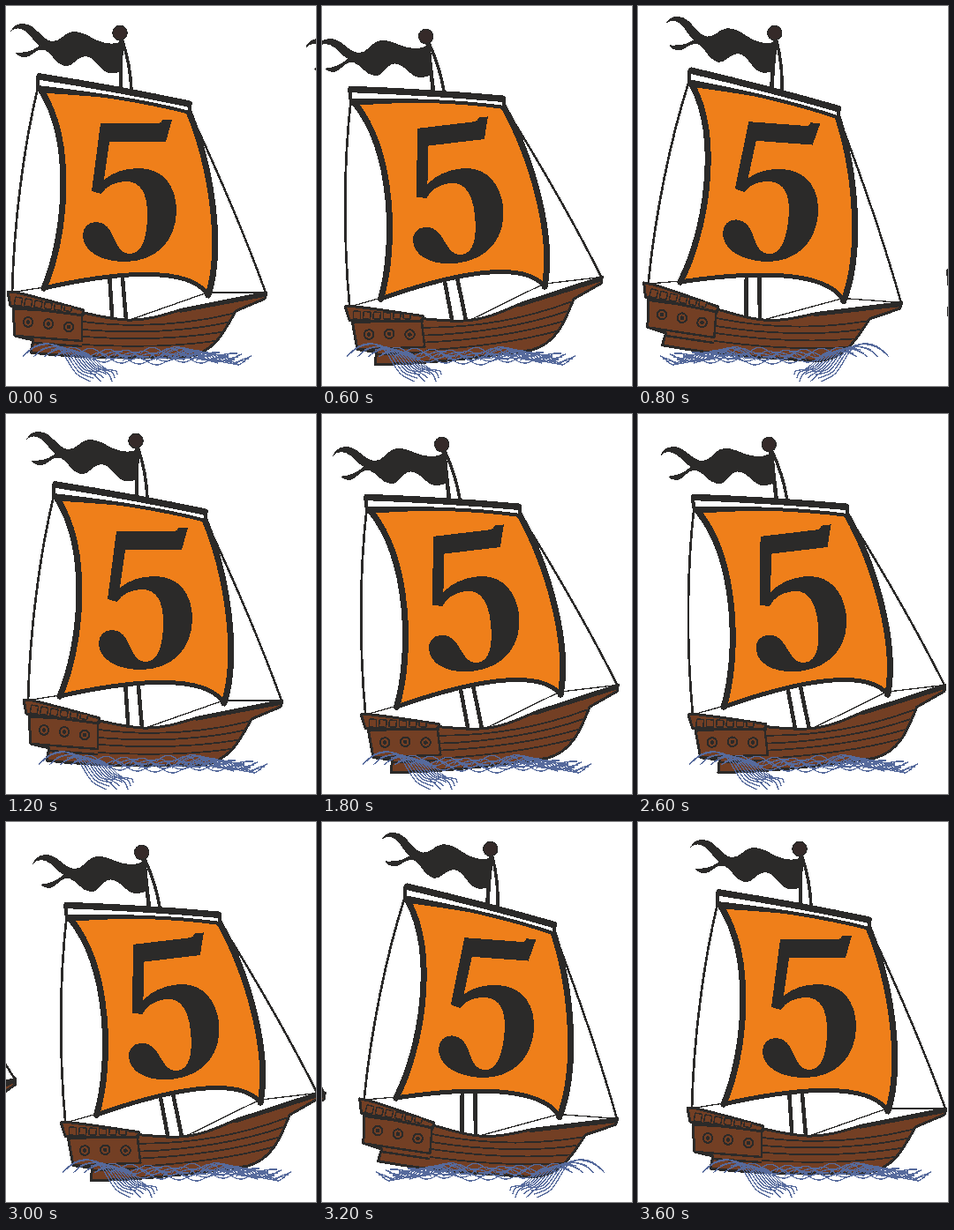
Recreate the animation shown at these times as an HTML page. Size 351x431 px, loop 3800 ms.

```html
<!DOCTYPE html>
<html lang="en">
<head>
<meta charset="utf-8">
<title>Sailing ship</title>
<style>
  html, body { margin: 0; width: 100%; height: 100%; overflow: hidden; background: #fff; }
  svg { display: block; width: 351px; height: 431px; shape-rendering: crispEdges; }
  .line { fill: none; stroke: #2b2a29; stroke-linecap: round; stroke-linejoin: round; }
  .ink { fill: #2b2a29; }
  .wood { fill: #733f24; stroke: #2b2a29; stroke-linejoin: round; }
  .wave { fill: none; stroke: #566a9c; stroke-width: 1.3; stroke-linecap: round; }
</style>
</head>
<body>
<svg viewBox="0 0 351 431">
  <defs>
    <g id="ship">
      <!-- pole and flag -->
      <path class="line" stroke-width="4.500" d="M130 38 V93"/>
      <path class="line" stroke-width="3.500" d="M132 40 C137 55 141 75 142 95"/>
      <path class="ink" d="M133 39 C122 45 112 43 101 38 C90 32 82 27 72 30 C64 33 61 41 51 40 C39 37 34 21 20 20
        C12 20 8 23 5 29 C12 23 19 25 25 31 C30 36 32 41 38 45 C32 49 27 53 11 53 C14 57 19 60 26 57
        C33 53 36 48 44 50 C52 53 55 65 66 68 C76 70 79 58 89 57 C101 57 105 73 116 76 C122 77 127 76 132 73 Z"/>
      <circle cx="129" cy="30.500" r="8" fill="#352a29" stroke="#2b2a29" stroke-width="1.500"/>

      <!-- rigging -->
      <path class="line" stroke-width="2.700" d="M36 93 C20 160 9 245 7 325"/>
      <path class="line" stroke-width="2.500" d="M209 122 C236 180 267 250 294 325"/>
      <path class="line" stroke-width="1.300" d="M5 325 L43 319 M140 356 L228 325 H294"/>
      <path class="line" stroke-width="4.500" d="M117 304 L120.500 356 M131.500 303 L136 356"/>

      <!-- sail -->
      <path fill="#ef7f1a" d="M40 96 C80 99 150 101 207 120 C231 178 247 270 229 328 C205 290 105 306 43 320 C67 264 78 156 40 96 Z"/>
      <path class="line" stroke-width="7" d="M40 96 C78 156 67 264 43 320 M207 120 C231 178 247 270 229 328"/>
      <path class="line" stroke-width="5" d="M40 96 C80 99 150 101 207 120 M43 320 C105 306 205 290 229 328"/>
      <path class="ink" role="img" aria-label="5" d="M107 133 H171 C175 133 176 132 177 129 H188 L181 154 H117 L111 197
        C122 188 135 184 151 184 C178 184 193 205 193 232 C193 267 169 290 135 290 C107 290 87 278 87 260
        C87 251 93 245 102 245 C113 245 118 253 123 265 C128 277 133 281 140 281 C154 281 160 263 160 236
        C160 212 152 199 136 199 C124 199 113 204 108 213 L97 210 Z"/>

      <!-- yard -->
      <path fill="#fff" stroke="#2b2a29" stroke-width="4" stroke-linejoin="round" d="M36 80 C95 90 155 101 208 111 L208 121 C155 107 95 99 36 92 Z"/>
      <path class="line" stroke-width="7.500" d="M38 80 C95 89 155 100 207 111"/>

      <!-- hull -->
      <path class="wood" stroke-width="3" d="M8 343 L10 374 L31 379 L28 393 C90 400 150 399 205 398 C234 394 246 372 260 346
        L293 332 L295 325 L200 344 C180 350 160 357 137 356 C115 355 100 350 87 348 Z"/>
      <path class="wood" stroke-width="3" d="M2 324 L12 325 C38 331 62 338 88 345 L87 351 C60 347 30 344 5 340 Z"/>
      <path class="line" stroke-width="3.500" d="M198 346 L294 328"/>
      <path class="line" stroke-width="2.500" d="M10 374 L86 380 V349 M31 382 L85 386"/>
      <path class="line" stroke-width="1.800" d="M87 358 C150 366 210 360 256 349 M87 367 C145 372 205 369 250 359
        M87 375 C145 379 200 377 243 370 M87 384 C140 387 195 386 236 380"/>
      <g id="fittings"></g>
    </g>
    <g id="waves" class="wave"></g>
  </defs>
  <g id="scene"></g>
</svg>
<script>
const FRAME_MS = 200, FRAMES = 19, DRIFT = 3, SPACING = 353;
const PIVOT = "148 198";
// Rocking cycle: angle, x offset, y offset.
const POSES = [
  [0, 0, 0], [-6.8, 0, 0.6], [-12.3, 0, 0],
  [-6.8, -0.7, 0.6], [4.2, 1.5, 1], [8.6, 1, -1]
];

const byId = id => document.getElementById(id);

function add(parent, tag, attrs) {
  const node = document.createElementNS("http://www.w3.org/2000/svg", tag);
  for (const key in attrs) node.setAttribute(key, attrs[key]);
  parent.append(node);
  return node;
}

function buildFittings() {
  const box = byId("fittings");
  for (let i = 0; i < 6; i++) {
    const x = 10 + i * 11.5;
    add(box, "rect", {
      x, y: 330 + i * 1.9, width: 8, height: 9 - i * 0.6, rx: 1,
      class: "wood", "stroke-width": 1.5, transform: `rotate(10 ${x} 335)`
    });
  }
  for (const [cx, cy] of [[25, 358.5], [48, 360.5], [71, 364]]) {
    add(box, "circle", { cx, cy, r: 5.3, class: "wood", "stroke-width": 2 });
    add(box, "circle", { cx, cy, r: 2.3, class: "ink" });
  }
}

function buildWaves() {
  const stroke = d => add(byId("waves"), "path", { d });
  // Left crest falling into a fan below the hull.
  for (let i = 0; i < 11; i++) {
    const x = 19 + i * 4, y = 398 - (i % 3) * 4;
    stroke(`M${x} ${y} C${x + 16} ${378 + i} ${x + 36} ${378 + i * 1.5} ${x + 47} ${396 + i}
      S${76 + i * 5} ${418 - i} ${96 + i * 3} ${426 - (i % 4) * 4}`);
  }
  // Low ripples along the hull.
  for (let i = 0; i < 14; i++) {
    const x = 62 + i * 10, y = 390 + (i * 5) % 9;
    stroke(`M${x} ${y + 5} q12 -14 24 -3 t22 5 t24 -5`);
  }
  // Right crest.
  for (let i = 0; i < 11; i++) {
    const x = 170 + i * 5, y = 402 - (i % 3) * 3;
    stroke(`M${x} ${y} C${x + 14} ${385 + i} ${x + 25} ${382 + i} ${x + 36} ${393 + i}
      S${x + 48} ${398 + i % 3} ${240 + i * 3.8} ${405 - (i * 3) % 11}`);
  }
}

buildFittings();
buildWaves();
const scene = byId("scene");
const ships = [-1, 0, 1].map(slot => ({ slot, node: add(scene, "use", { href: "#ship" }) }));
const waves = add(scene, "use", { href: "#waves" });

function draw(frame) {
  const drift = frame * DRIFT;
  for (const { slot, node } of ships) {
    const [angle, dx, dy] = POSES[(frame + slot + 6) % 6];
    const x = drift + dx + slot * SPACING;
    node.setAttribute("transform", `translate(${x} ${dy}) rotate(${angle} ${PIVOT})`);
  }
  const flipped = frame % 6 > 3;
  waves.setAttribute("transform", flipped
    ? `translate(${drift + 291} 0) scale(-1 1)`
    : `translate(${drift} 0)`);
}

const start = performance.now();
function tick() {
  draw(Math.floor((performance.now() - start) / FRAME_MS) % FRAMES);
  requestAnimationFrame(tick);
}
draw(0);
requestAnimationFrame(tick);
</script>
</body>
</html>
```
